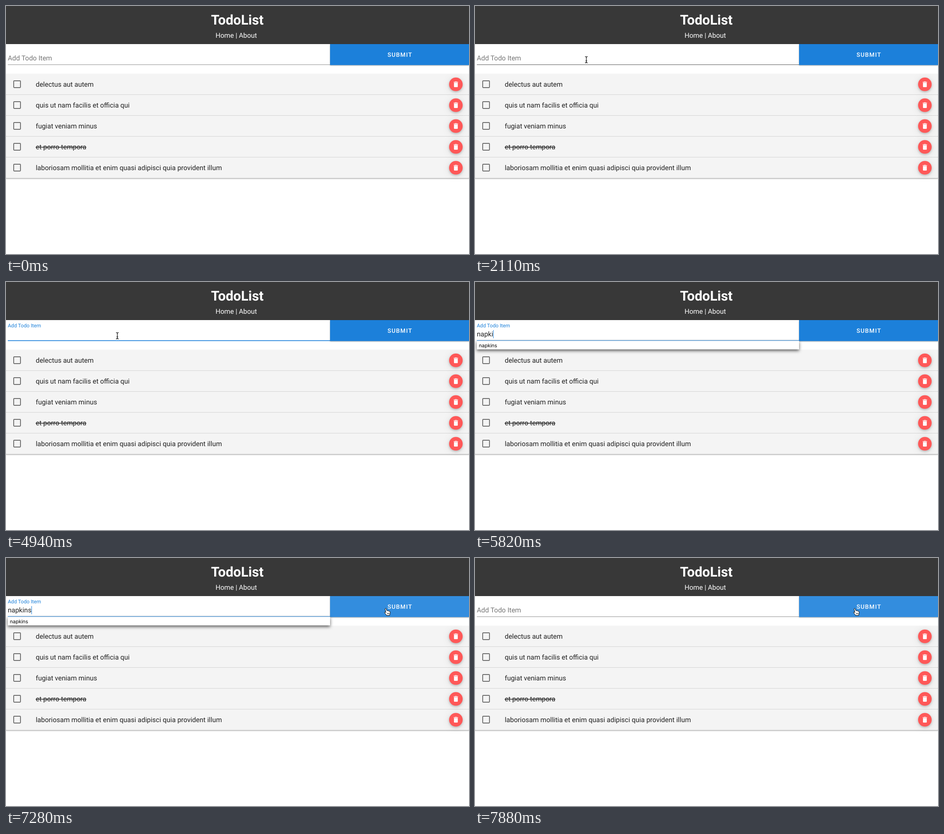
An HTML page that plays this animation: 1023x547 px, repeating every 8 s.

```html
<!DOCTYPE html>
<html lang="en">
<head>
<meta charset="utf-8">
<title>TodoList</title>
<style>
html, body { margin: 0; width: 100%; height: 100%; overflow: hidden; background: #fff; }
svg { display: block; width: 1023px; height: 547px; font: 15px Roboto, sans-serif; text-rendering: geometricPrecision; }
text { white-space: pre; }
.ink { fill: #212121; }
.card { filter: drop-shadow(0 1.5px 1.2px rgba(0,0,0,.36)); }
.fab { filter: drop-shadow(0 2px 2.5px rgba(0,0,0,.22)) drop-shadow(0 2px 8px rgba(0,0,0,.1)); }
#menu rect { filter: drop-shadow(0 3px 3.5px rgba(0,0,0,.65)); }
</style>
</head>
<body>
<svg viewBox="0 0 1023 547">
  <defs>
    <clipPath id="clip"><rect x="716" y="84" width="307" height="46.3"/></clipPath>
    <path id="bar" d="M-3-6.5Q0-6.5 0-4.5V5.5Q0 7.5-3 7.5M3-6.5Q0-6.5 0-4.5M3 7.5Q0 7.5 0 5.5M-1.8 3H1.8"/>
  </defs>
  <rect width="1023" height="84" fill="#383838"/>
  <g fill="#fff">
    <text x="511" y="40.5" font-size="30" font-weight="700" text-anchor="middle">TodoList</text>
    <text x="508.8" y="69.5" text-anchor="middle">Home | About</text>
  </g>

  <g id="list"></g>

  <rect id="base" x="4" y="129" width="712" height="1"/>
  <rect id="line" y="128.5" height="1.7"/>
  <text id="label">Add Todo Item</text>
  <text id="value" class="ink" x="4" y="120.2"></text>
  <rect id="caret" y="106" width="1" height="18" fill="#1c80da"/>

  <rect class="card" x="716" y="84" width="307" height="46.3" fill="#1c80da"/>
  <g clip-path="url(#clip)" fill="#fff">
    <rect id="glow" x="716" y="84" width="307" height="47"/>
    <circle id="ripple"/>
  </g>
  <text x="842.9" y="111.6" fill="#fff" font-size="13.1" font-weight="500" letter-spacing="1.25">SUBMIT</text>

  <g id="menu">
    <rect x="4" y="129.6" width="712" height="19" fill="#fff"/>
    <text x="8.5" y="143.6" font-size="11" font-family="Inter, sans-serif">napkins</text>
  </g>

  <g id="pointer">
    <path id="arrow" d="M.7 .8V14.3L3.9 11.3L6 16.3L8.4 15.3L6.3 10.5H10.6Z" stroke="#fff"/>
    <g id="beam" fill="none">
      <use href="#bar" stroke="#fff" stroke-width="2.4"/>
      <use href="#bar" stroke="#000" stroke-width="1.2"/>
    </g>
    <g id="hand" stroke="#000" stroke-linejoin="round">
      <path d="M-4.5-5.5Q-4.3-7.4-2.7-6.8Q-2-6.4-1.6-5L-.6-1.8Q.8-2.6 1.8-1.3Q3.3-2 4.2-.7Q6.4-1 6.8 1.2Q7.3 4 6 6.5L5.6 8.7H-1.2Q-2 6.6-4.2 4.3Q-6.3 1.8-5.4 1.2Q-4.4 .6-2.5 2.4Z" fill="#fff"/>
      <path d="M.6 3V6M2.5 3V6M4.4 3V6" stroke-width=".8"/>
    </g>
  </g>
</svg>
<script>
const $ = id => document.getElementById(id);
const set = (id, attrs) => { for (const k in attrs) $(id).setAttribute(k, attrs[k]); };
const show = (id, on) => set(id, { visibility: on ? 'visible' : 'hidden' });
const lerp = (a, b, p) => a + (b - a) * p;
const mix = (a, b, p) => `rgb(${a.map((v, i) => Math.round(lerp(v, b[i], p)))})`;
const ramp = (t, start, length) => Math.min(1, Math.max(0, (t - start) / length));
const easeOut = (p, power) => 1 - (1 - p) ** power;
const ease = (t, start, power = 3.2) => easeOut(ramp(t, start, 300), power);

const BLUE = [28, 128, 218], GREY = [117, 117, 117], BLACK = [20, 20, 20];
const ENTER = 500, APPROACH = 1090, FOCUS = 3116, TYPE = 5380, LEAVE = 6410, BLUR = 7332, CLEAR = 7560;
const TICK = 145;
const TRASH = 'M19 4H15.5L14.5 3H9.5L8.5 4H5V6H19ZM6 19A2 2 0 0 0 8 21H16A2 2 0 0 0 18 19V7H6Z';

const todos = ['delectus aut autem', 'quis ut nam facilis et officia qui', 'fugiat veniam minus',
  'et porro tempora', 'laboriosam mollitia et enim quasi adipisci quia provident illum'];
$('list').innerHTML = '<rect class="card" y="150" width="1023" height="230" fill="#f4f4f4"/>' +
  todos.map((todo, i) => `<g transform="translate(0 ${150 + 46 * i})">
    <path d="M0 45.5H1023" stroke="#b4b4b4" stroke-dasharray="1 1"/>
    <rect x="17" y="15" width="15" height="15" rx="1.2" fill="none" stroke="#707070" stroke-width="1.9"/>
    <text class="ink" x="65.7" y="28.2"${i === 3 ? ' text-decoration="line-through"' : ''}>${todo}</text>
    <circle class="fab" cx="994" cy="22.8" r="15" fill="#ff5858"/>
    <path transform="translate(985.6 14.4) scale(.7)" d="${TRASH}" fill="#fff"/></g>`).join('');

// The screen refreshes in fixed ticks counted from the start of each action.
function refreshed(t) {
  const start = [0, ENTER, APPROACH, 3140, TYPE, LEAVE, 7580].filter(s => s <= t).pop();
  return start + Math.floor((t - start) / TICK) * TICK;
}

// Pointer strokes: quadratic curves from a through c to b.
const strokes = [
  { start: ENTER, length: 290, power: 1, a: [654, 523], c: [560, 412], b: [480, 322] },
  { start: APPROACH, length: 1020, power: 3, a: [470, 285], c: [471, -36], b: [246, 118] },
  { start: LEAVE - TICK, length: 725, power: 1.3, a: [246, 118], c: [560, 124], b: [842, 127] },
  { start: 6990, length: 290, power: 2, a: [842, 127], c: [842, 122], b: [842, 118] }
];

function pointerAt(t) {
  const { start, length, power, a, c, b } = strokes.filter(s => s.start <= t).pop() || strokes[0];
  const p = easeOut(ramp(t, start, length), power);
  return [0, 1].map(i => lerp(lerp(a[i], c[i], p), lerp(c[i], b[i], p), p));
}

function drawField(t, now) {
  const focus = t < BLUR ? ease(t, FOCUS) : 1 - ease(t, BLUR);
  const raised = t < CLEAR ? ease(t, FOCUS) : 1 - ease(t, CLEAR);
  const hover = t < BLUR ? ramp(t, 1960, 290) : 0;

  set('base', { fill: mix([146, 146, 146], [33, 33, 33], hover) });
  set('line', { x: 360 - 356 * focus, width: 712 * focus, fill: mix(BLACK, BLUE, focus) });
  set('label', {
    transform: `translate(4 ${lerp(120.2, 99.8, raised)}) scale(${lerp(1, .75, raised)})`,
    fill: mix(GREY, BLUE, focus)
  });

  const typed = t < TYPE || t >= CLEAR ? 0 : Math.min(7, 1 + Math.floor((t - TYPE) / 95));
  $('value').textContent = 'napkins'.slice(0, typed);
  const typing = typed > 0 && typed < 7;
  const blink = Math.floor((now - (typed ? 5960 : 3140)) / 600) % 2 === 0;
  show('caret', t >= FOCUS && t < BLUR && (typing || blink));
  set('caret', { x: 4 + (typed ? $('value').getComputedTextLength() : 0) });
  show('menu', t >= TYPE && t < BLUR);
}

function drawButton(t) {
  const spread = ease(t, BLUR, 2.4);
  set('glow', { opacity: .1 * ramp(t, 6990, 290) });
  set('ripple', {
    cx: lerp(842, 869.5, spread), cy: lerp(112, 107, spread), r: lerp(46, 155, spread),
    opacity: t < BLUR ? 0 : .25 * (1 - ramp(t, 7585, 100))
  });
}

function drawPointer(t) {
  const [x, y] = pointerAt(t);
  const inBar = y > 90 && y < 131;
  const shape = !inBar ? 'arrow' : x >= 716 ? 'hand' : 'beam';
  const visible = t >= ENTER && (t < TYPE || t >= LEAVE);
  for (const id of ['arrow', 'beam', 'hand']) show(id, visible && id === shape);
  set('pointer', { transform: `translate(${x} ${y})` });
}

function loop() {
  const now = performance.now() % 8000;
  const t = refreshed(now);
  drawField(t, now);
  drawButton(t);
  drawPointer(t);
  requestAnimationFrame(loop);
}
loop();
</script>
</body>
</html>
```
